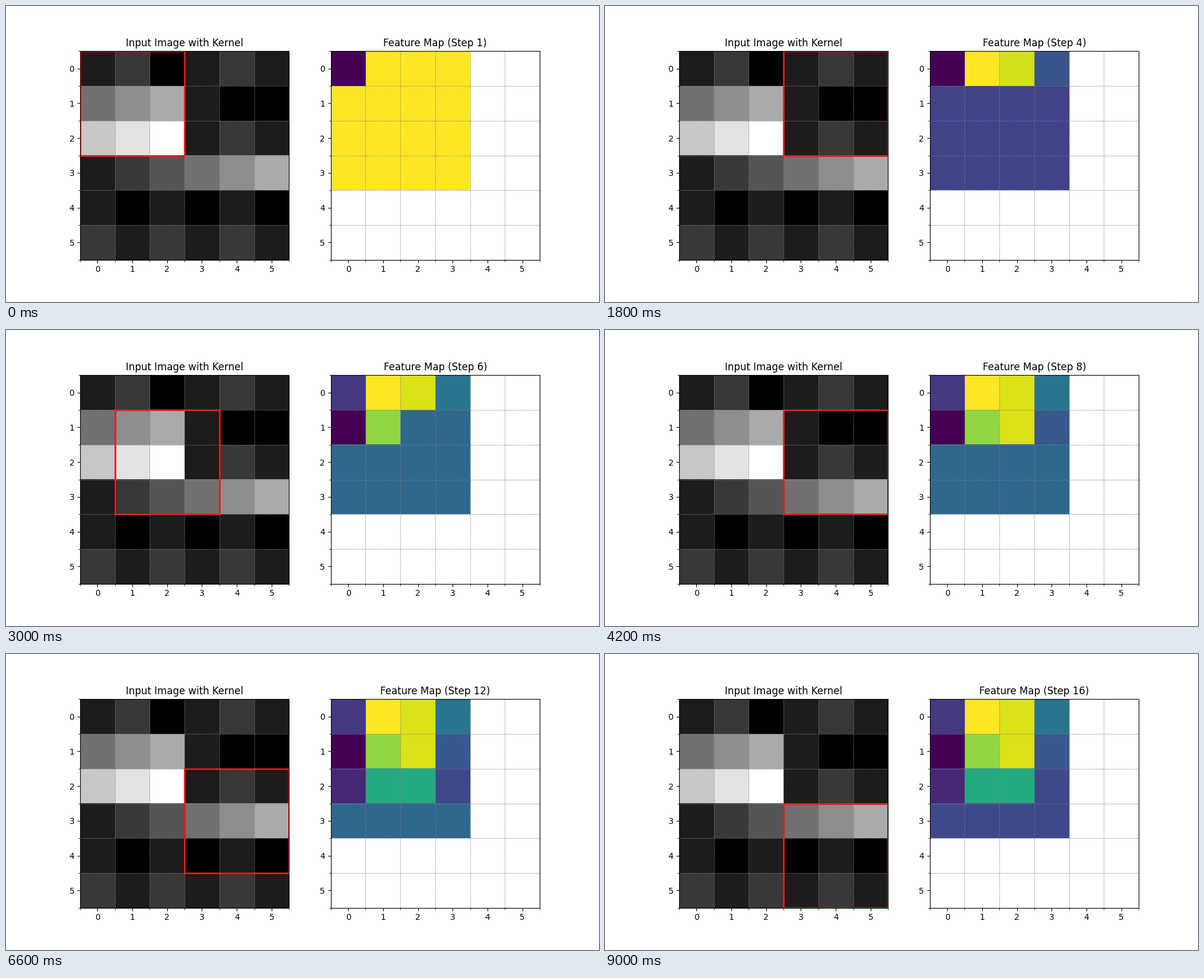
These frames come from a looping animation (1000 by 500 pixels, 9.6 s). A matplotlib script:

```python
import numpy as np
import matplotlib.pyplot as plt
from matplotlib.animation import FuncAnimation
from matplotlib.patches import Rectangle

SIZE, K = 6, 3
OUT = SIZE - K + 1


def make_image():
    cols = np.arange(SIZE)
    img = np.zeros((SIZE, SIZE))
    # Top left: a ramp with a dark corner.
    img[:K, :K] = np.arange(1, K * K + 1).reshape(K, K)
    img[0, K - 1] = 0
    # Top right: a faint ridge with a gap.
    img[:K, K:] = 1 + cols[:K] % 2
    img[1, K + 1:] = 0
    # Below: one ramp and two alternating rows.
    img[3] = cols + 1
    img[4] = 1 - cols % 2
    img[5] = 2 - cols % 2
    return img


def feature_map(steps):
    """Vertical edge response after the given number of window positions."""
    out = np.zeros((OUT, OUT))
    for n in range(steps):
        r, c = divmod(n, OUT)
        patch = image[r:r + K, c:c + K]
        out[r, c] = patch[:, 0].sum() - patch[:, -1].sum()
    return out


def setup_axes(ax):
    edges = np.arange(-0.5, SIZE)
    for axis in (ax.xaxis, ax.yaxis):
        axis.set_ticks(np.arange(SIZE))
        axis.set_ticks(edges, minor=True)
    ax.grid(which="minor", color="gray", linestyle="--", linewidth=0.5)
    ax.set_xlim(-0.5, SIZE - 0.5)
    ax.set_ylim(SIZE - 0.5, -0.5)


image = make_image()
fig, (ax_in, ax_out) = plt.subplots(1, 2, figsize=(10, 5), dpi=100)

ax_in.imshow(image, cmap="gray")
ax_in.set_title("Input Image with Kernel")
window = ax_in.add_patch(
    Rectangle((-0.5, -0.5), K, K, linewidth=2, edgecolor="red", facecolor="none"))

result = ax_out.imshow(feature_map(1), cmap="viridis")
for ax in (ax_in, ax_out):
    setup_axes(ax)


def update(n):
    r, c = divmod(n, OUT)
    window.set_xy((c - 0.5, r - 0.5))
    values = feature_map(n + 1)
    result.set_data(values)
    result.set_clim(values.min(), values.max())
    ax_out.set_title(f"Feature Map (Step {n + 1})")
    return window, result


anim = FuncAnimation(fig, update, frames=OUT * OUT, interval=600,
                     repeat=True, repeat_delay=0, blit=False)
plt.show()
```
